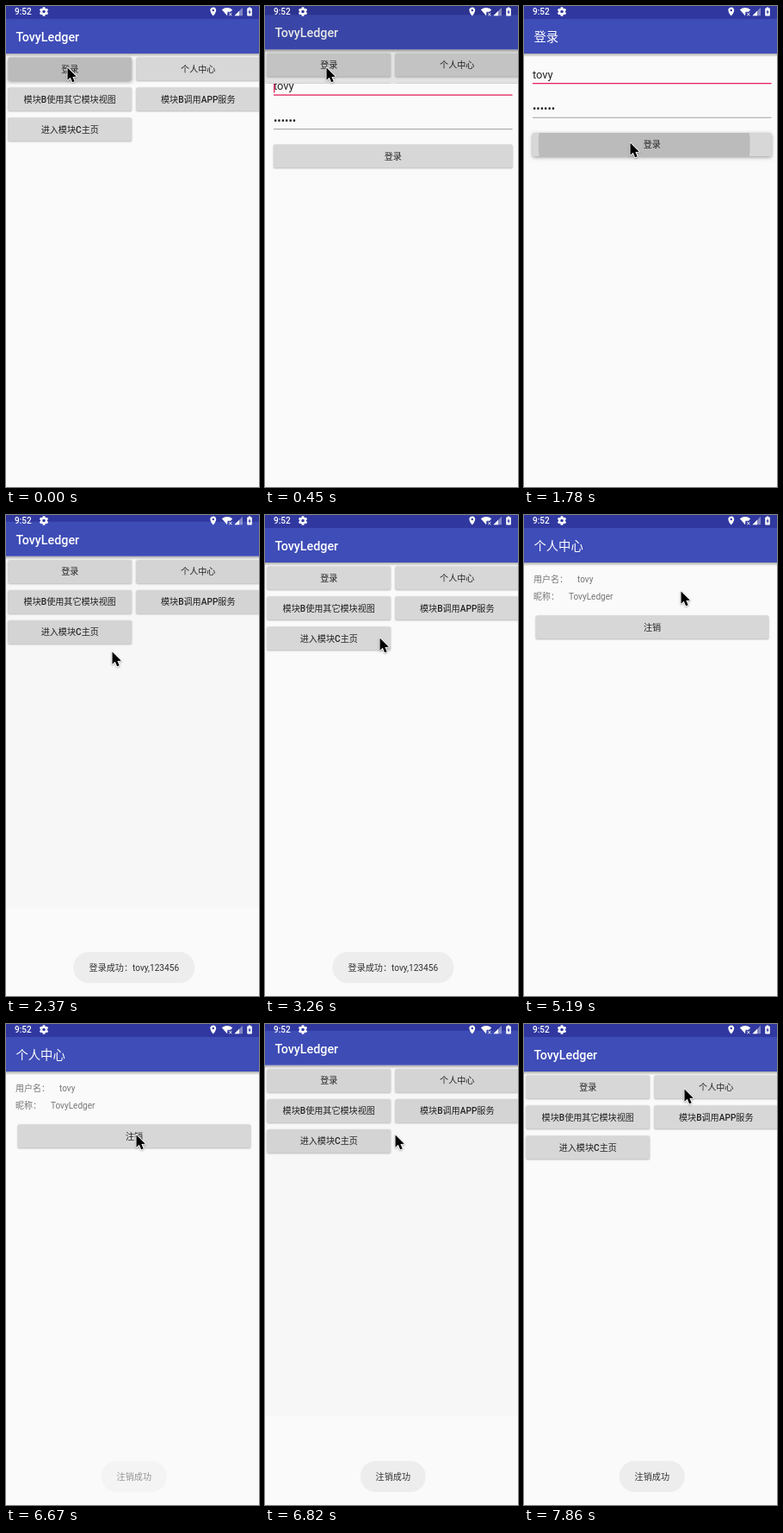
Animation, 294 px wide and 557 px high, one loop 8000 ms. Source, as an HTML page with a canvas:

```html
<!DOCTYPE html>
<html lang="zh">
<head>
<meta charset="utf-8">
<style>
html, body { margin: 0; width: 100%; height: 100%; overflow: hidden; background: #fafafa; }
canvas { display: block; width: 294px; height: 557px; }
</style>
</head>
<body>
<canvas id="stage"></canvas>
<script>
const W = 294, H = 557, LOOP = 8000, TICKS = 54;
const APP = 'TovyLedger', USER = 'tovy';
const FONT = 'Roboto, "Noto Sans CJK SC", "Noto Sans CJK", sans-serif';
const canvas = document.getElementById('stage');
const ctx = canvas.getContext('2d');
const dpr = window.devicePixelRatio || 1;
canvas.width = W * dpr;
canvas.height = H * dpr;

const clamp = (v) => Math.max(0, Math.min(1, v));
const mix = (a, b, k) => a + (b - a) * k;

const bez = (s, a, b, c, d) => {
  const r = 1 - s;
  return r * r * r * a + 3 * r * r * s * b + 3 * r * s * s * c + s * s * s * d;
};
function curve(x, px, py) {
  let lo = 0, hi = 1;
  for (let i = 0; i < 24; i++) {
    const mid = (lo + hi) / 2;
    if (bez(mid, ...px) < x) lo = mid; else hi = mid;
  }
  return bez(lo, ...py);
}
const slideEase = (u) => curve(u, [0, 0.4, 0.2, 1], [0, 0, 1, 1]);
const clipEase = (u) => u < 0.166
  ? curve(u, [0, 0.05, 0.133, 0.166], [0, 0, 0.06, 0.4])
  : curve(u, [0.166, 0.208, 0.25, 1], [0.4, 0.82, 1, 1]);

function text(str, x, y, size, color, align = 'left', weight = 400) {
  ctx.font = `${weight} ${size}px ${FONT}`;
  ctx.textAlign = align;
  ctx.fillStyle = color;
  ctx.fillText(str, x, y);
}
function rect(x, y, w, h, color) {
  ctx.fillStyle = color;
  ctx.fillRect(x, y, w, h);
}
function roundPath(x, y, w, h, r) {
  ctx.beginPath();
  ctx.roundRect(x, y, w, h, r);
}
function poly(points, color) {
  ctx.beginPath();
  points.forEach(([x, y]) => ctx.lineTo(x, y));
  ctx.closePath();
  ctx.fillStyle = color;
  ctx.fill();
}

// press: { age in ticks, x of the touch }
function button(label, x, y, w, h, press) {
  const active = press && press.age >= 0 && press.age < 3;
  ctx.save();
  ctx.shadowColor = `rgba(0,0,0,${active ? 0.4 : 0.32})`;
  ctx.shadowBlur = (active ? 4 : 2) * dpr;
  ctx.shadowOffsetY = (active ? 1.3 : 0.6) * dpr;
  roundPath(x, y, w, h, 1.5);
  ctx.fillStyle = '#d6d7d6';
  ctx.fill();
  ctx.restore();
  if (active) {
    const grow = press.age ? 1 : 0.65;
    const cx = mix(press.x, x + w / 2, grow);
    const r = w / 2 * mix(0.6, 1.04, grow);
    ctx.save();
    roundPath(x, y, w, h, 1.5);
    ctx.clip();
    ctx.beginPath();
    ctx.arc(cx, y + h / 2, r, 0, 7);
    ctx.fillStyle = `rgba(0,0,0,${press.age > 1 ? 0.065 : 0.13})`;
    ctx.fill();
    ctx.restore();
  }
  text(label, x + w / 2, y + h / 2 + 3.7, 10.1, '#222', 'center', 500);
}

function frame(title) {
  rect(0, 0, W, H + 30, '#fafafa');
  const shade = ctx.createLinearGradient(0, 55, 0, 59);
  shade.addColorStop(0, 'rgba(0,0,0,.32)');
  shade.addColorStop(1, 'rgba(0,0,0,0)');
  rect(0, 55, W, 4, shade);
  rect(0, 0, W, 55, '#3f4db8');
  rect(0, 0, W, 15, '#3038a0');
  text(title, 11.5, 41, 14.3, '#fff', 'left', 500);
}

const pages = {
  home(tick) {
    frame(APP);
    button('登录', 2.5, 59.5, 143.5, 27, { age: tick + 1, x: 71 });
    button('个人中心', 151.5, 59.5, 143.5, 27, { age: tick - 27, x: 187 });
    button('模块B使用其它模块视图', 2.5, 94.5, 143.5, 27);
    button('模块B调用APP服务', 151.5, 94.5, 143.5, 27);
    button('进入模块C主页', 2.5, 129.5, 143.5, 27);
  },
  login(tick, time) {
    frame('登录');
    text(USER, 10, 83.7, 12.9, '#222');
    rect(10, 89, 277.5, 1.3, '#e5245f');
    if ((time + 110) % 1000 < 500 || time < 880) rect(10, 70.5, 1.4, 16.5, '#e5245f');
    text('••••••', 10, 123.4, 12.9, '#222');
    rect(10, 128.8, 277.5, 0.8, '#8c8c8c');
    button('登录', 10, 147, 277.5, 27, { age: tick - 12, x: 123 });
  },
  profile(tick) {
    const grey = '#757575';
    frame('个人中心');
    text('用户名：', 11, 77.6, 10, grey);
    text(USER, 62, 77.6, 10, grey);
    text('昵称：', 11, 98.4, 10, grey);
    text(APP, 52, 98.4, 10, grey);
    button('注销', 13.8, 116.5, 270.4, 27, { age: tick - 42, x: 151 });
  }
};

const visits = [
  { page: 'login', open: 310, close: 2245 },
  { page: 'profile', open: 4210, close: 6690 }
];
const SLIDE = 425;

function drawPage(name, offset, tick, time) {
  ctx.save();
  ctx.translate(0, offset);
  pages[name](tick, time);
  ctx.restore();
}

function drawPages(tick, time) {
  const visit = visits.find((v) => time > v.open && time < v.close + SLIDE);
  if (!visit) return drawPage('home', 0, tick, time);
  const closing = time > visit.close;
  const u = clamp((time - (closing ? visit.close : visit.open)) / SLIDE);
  const way = (k) => closing ? 1 - k : k;
  const shift = way(slideEase(u));
  rect(0, 0, W, H, '#e1e1e1');
  drawPage('home', -0.0202 * H * shift, tick, time);
  rect(0, 0, W, H, `rgba(0,0,0,${0.1 * way(clamp(u * 3))})`);
  const offset = 0.041 * H * (1 - shift);
  const top = 0.959 * H * (1 - way(clipEase(u)));
  ctx.save();
  ctx.beginPath();
  ctx.rect(0, top < 0.5 && offset < 0.5 ? 0 : top + offset, W, H);
  ctx.clip();
  drawPage(visit.page, offset, tick, time);
  ctx.restore();
}

function gear(x, y) {
  ctx.fillStyle = '#fff';
  for (let i = 0; i < 6; i++) {
    ctx.save();
    ctx.translate(x, y);
    ctx.rotate(i * Math.PI / 3);
    ctx.fillRect(-1.4, -5.2, 2.8, 3);
    ctx.restore();
  }
  ctx.beginPath();
  ctx.arc(x, y, 2.9, 0, 7);
  ctx.lineWidth = 2.2;
  ctx.strokeStyle = '#fff';
  ctx.stroke();
}

function statusBar() {
  text('9:52', 10, 10.3, 10, '#fff', 'left', 500);
  gear(44, 6.5);
  // location pin
  ctx.fillStyle = '#fff';
  ctx.beginPath();
  ctx.arc(240.8, 5, 3.4, Math.PI * 0.9, Math.PI * 2.1);
  ctx.quadraticCurveTo(243.5, 8.5, 240.8, 11.6);
  ctx.quadraticCurveTo(238, 8.5, 237.5, 6);
  ctx.fill();
  ctx.beginPath();
  ctx.arc(240.8, 5, 1.2, 0, 7);
  ctx.fillStyle = '#3038a0';
  ctx.fill();
  // wifi
  ctx.beginPath();
  ctx.moveTo(257, 11.3);
  ctx.lineTo(250.8, 4.2);
  ctx.quadraticCurveTo(257, -0.4, 263.2, 4.2);
  ctx.lineTo(261, 6.7);
  ctx.lineTo(257.5, 6.7);
  ctx.closePath();
  ctx.fillStyle = '#fff';
  ctx.fill();
  ctx.beginPath();
  ctx.moveTo(259.2, 8);
  ctx.lineTo(262.4, 11.2);
  ctx.moveTo(262.4, 8);
  ctx.lineTo(259.2, 11.2);
  ctx.lineWidth = 1;
  ctx.stroke();
  // signal
  poly([[265.5, 11.3], [275, 1.8], [275, 11.3]], 'rgba(255,255,255,.4)');
  poly([[265.5, 11.3], [271, 5.8], [271, 11.3]], '#fff');
  // battery
  rect(281.8, 1.5, 2.4, 1.5, '#fff');
  roundPath(280.2, 2.4, 5.6, 9.1, 0.8);
  ctx.fillStyle = '#fff';
  ctx.fill();
  poly([[283.4, 3.8], [281.4, 7.6], [282.7, 7.6], [282.7, 10.2], [284.7, 6.4], [283.4, 6.4]], '#3038a0');
}

const toasts = [
  { label: `登录成功：${USER},123456`, w: 141, from: 2150, to: 4225 },
  { label: '注销成功', w: 76, from: 6595, to: 8600 }
];

function drawToast(time) {
  for (const { label, w, from, to } of toasts) {
    const alpha = Math.min(clamp((time - from) / 145), clamp((to - time) / 145));
    if (!alpha) continue;
    ctx.save();
    ctx.globalAlpha = alpha;
    roundPath(148.8 - w / 2, 506, w, 36, 18);
    ctx.fillStyle = '#ededed';
    ctx.fill();
    text(label, 148.8, 527.6, 10.1, '#303030', 'center');
    ctx.restore();
  }
}

// tick, x, y
const route = [
  [0, 71, 71], [7, 71, 71], [8, 83, 92], [9, 110, 137], [10, 123, 158],
  [21, 123, 158], [22, 133, 142], [26, 187, 78], [34, 187, 78],
  [35, 182, 88], [41, 151, 128], [50, 151, 128], [53, 186, 75], [54, 186, 75]
];

function drawCursor(tick) {
  const i = route.findIndex((p) => p[0] > tick);
  const [a, ax, ay] = route[i - 1], [b, bx, by] = route[i];
  const k = (tick - a) / (b - a);
  ctx.save();
  ctx.translate(mix(ax, bx, k) + 0.5, mix(ay, by, k) + 0.5);
  ctx.beginPath();
  [[0, 0], [0, 14.2], [3.3, 11.3], [5.6, 16.8], [8.2, 15.7], [5.9, 10.4], [10.3, 10.2]]
    .forEach(([x, y]) => ctx.lineTo(x, y));
  ctx.closePath();
  ctx.lineJoin = 'round';
  ctx.lineWidth = 1.8;
  ctx.strokeStyle = '#fff';
  ctx.shadowColor = 'rgba(0,0,0,.35)';
  ctx.shadowBlur = 2 * dpr;
  ctx.shadowOffsetY = 0.8 * dpr;
  ctx.stroke();
  ctx.shadowColor = 'transparent';
  ctx.fillStyle = '#000';
  ctx.fill();
  ctx.restore();
}

function draw(now) {
  const tick = Math.floor(now % LOOP * TICKS / LOOP);
  const time = tick * LOOP / TICKS;
  ctx.setTransform(dpr, 0, 0, dpr, 0, 0);
  drawPages(tick, time);
  statusBar();
  drawToast(time);
  drawCursor(tick);
}

const start = performance.now();
function loop() {
  draw(performance.now() - start);
  requestAnimationFrame(loop);
}
loop();
</script>
</body>
</html>
```
